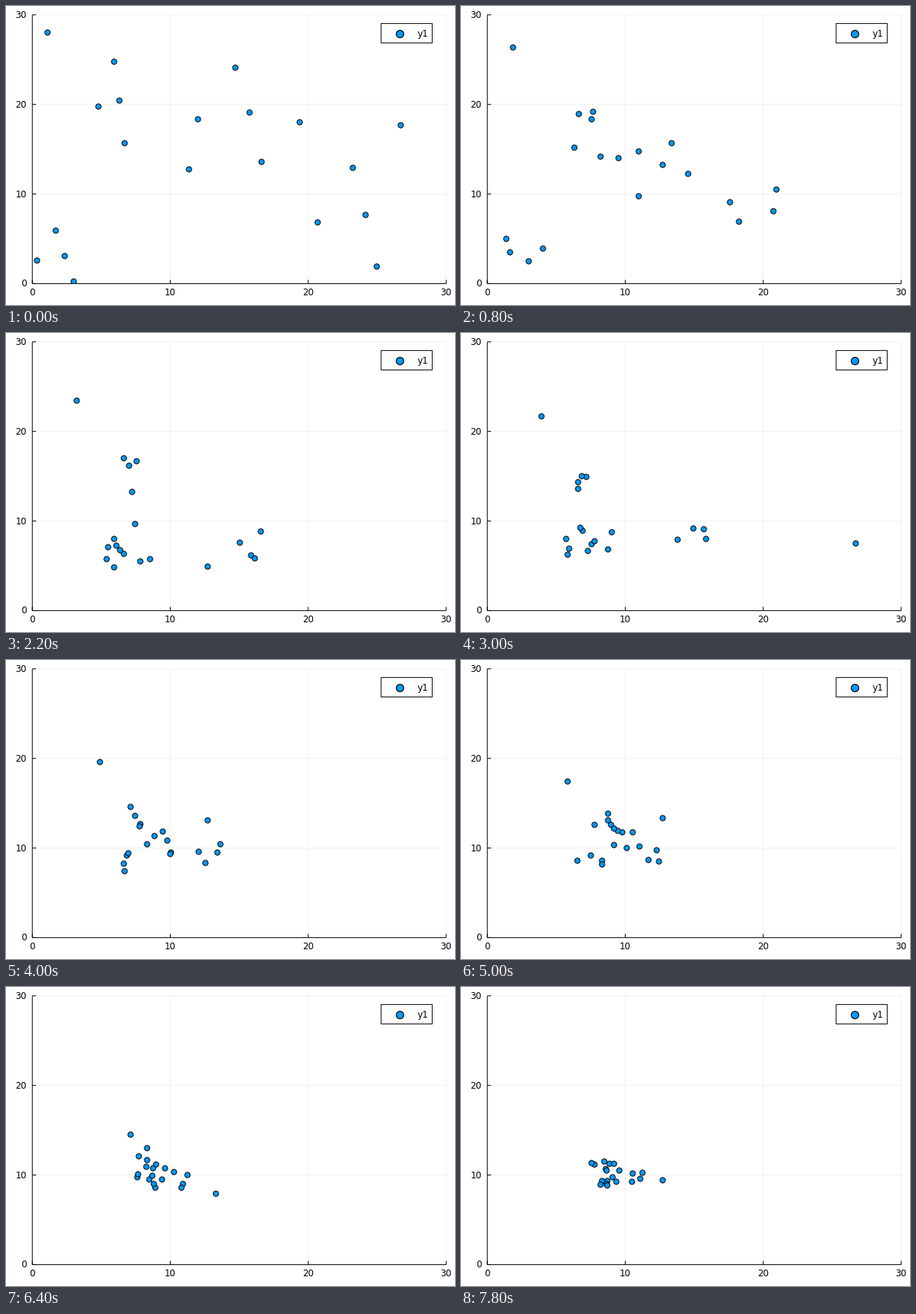
These frames come from a looping animation (600 px wide and 400 px high, 8000 ms). A matplotlib script:

```python
import numpy as np
import matplotlib.pyplot as plt
from matplotlib.animation import FuncAnimation
from matplotlib.patches import Rectangle

W, H, DPI = 600, 400, 100
FRAMES, STEP = 40, 200
LEFT, RIGHT, TOP, BOTTOM = 35.2, 588.2, 11.8, 371.4
BLUE = "#009afa"
GOAL = np.array([9.0, 10.3])

# size, start offset from the goal, decay, swing rate, start spread
FLOCKS = [
    (4, (-3.2, 9.0), 20, 0, (0.3, 2.4)),
    (4, (-7.5, -8.0), 15, 0, (0.9, 1.4)),
    (6, (5.5, 7.5), 13, 0.25, (2.0, 3.6)),
    (4, (14.0, -4.0), 16, 0, (1.4, 3.0)),
]

rng = np.random.default_rng(7)
spin = rng.uniform(-0.5, 0.5, sum(f[0] for f in FLOCKS))


def pt(px):
    return px * 72 / DPI


def to_px(x, y):
    return (LEFT + (RIGHT - LEFT) * np.asarray(x) / 30,
            BOTTOM - (BOTTOM - TOP) * np.asarray(y) / 30)


def flock(t, n, start, decay, rate, spread, turn):
    """A turning ellipse of points that shrinks as it closes on the goal."""
    k = np.arange(n)
    r = 2 * np.sqrt((k + 0.5) / n)
    a = 2.4 * k + 0.6 + turn * t
    size = np.array(spread) * np.exp(-t / 8) + 0.55
    centre = GOAL + np.array(start) * np.exp(-t / decay) * np.cos(rate * t)
    ring = np.column_stack([r * np.cos(a), r * np.sin(a)])
    return centre + size * ring


def rover(t):
    """Shoots far right every 15 steps while bobbing up and down."""
    burst = max(0, np.cos(2 * np.pi * t / 15)) ** 8
    bob = 7.4 * np.exp(-t / 35) * np.cos(2 * np.pi * t / 23)
    return GOAL + (3.7 + 14 * burst, bob)


def straggler(t):
    return GOAL + np.array([-7.9, 17.8]) * (1 - t / 42)


def swarm(t):
    parts, first = [], 0
    for n, *rule in FLOCKS:
        parts.append(flock(t, n, *rule, spin[first:first + n]))
        first += n
    xy = np.vstack(parts + [rover(t), straggler(t)])
    return np.column_stack(to_px(*np.clip(xy, 0.3, 29.5).T))


fig = plt.figure(figsize=(W / DPI, H / DPI), dpi=DPI, facecolor="white")
ax = fig.add_axes([0, 0, 1, 1])
ax.set_xlim(0, W)
ax.set_ylim(H, 0)
ax.axis("off")


def line(xs, ys, color="black", z=2):
    ax.plot(xs, ys, color=color, lw=pt(1), zorder=z, solid_capstyle="butt",
            snap=False)


def label(x, y, text, ha):
    ax.text(x, y, text, ha=ha, va="center", family="DejaVu Sans",
            size=pt(12), color="black")


def dots(xy, size, edge):
    return ax.scatter(*np.transpose(xy), s=pt(size) ** 2, c=BLUE,
                      edgecolors="black", linewidths=pt(edge), zorder=4,
                      snap=False)


for v in (0, 10, 20, 30):
    x, y = to_px(v, v)
    line([x, x], [TOP, BOTTOM], "#f1f1f1", 1)
    line([LEFT, RIGHT], [y, y], "#f1f1f1", 1)
    line([x, x], [BOTTOM - 5, BOTTOM])
    line([LEFT, LEFT + 5], [y, y])
    label(x, 383.5, str(v), "center")
    label(27.5, y + 0.5, str(v), "right")
line([LEFT, LEFT], [TOP, BOTTOM])
line([LEFT, RIGHT], [BOTTOM, BOTTOM])

ax.add_patch(Rectangle((501.2, 23.4), 68.4, 26, fc="white", ec="black",
                       lw=pt(1), zorder=2, snap=False))
dots([(525.5, 36.5)], 10, 1.2)
label(549.7, 38, "y1", "left")

points = dots(swarm(0), 7.2, 1)
points.set_clip_path(Rectangle((LEFT, TOP), RIGHT - LEFT, BOTTOM - TOP,
                               transform=ax.transData))


def update(i):
    points.set_offsets(swarm(i))
    return [points]


anim = FuncAnimation(fig, update, frames=FRAMES, interval=STEP, repeat=True,
                     repeat_delay=0)
plt.show()
```
